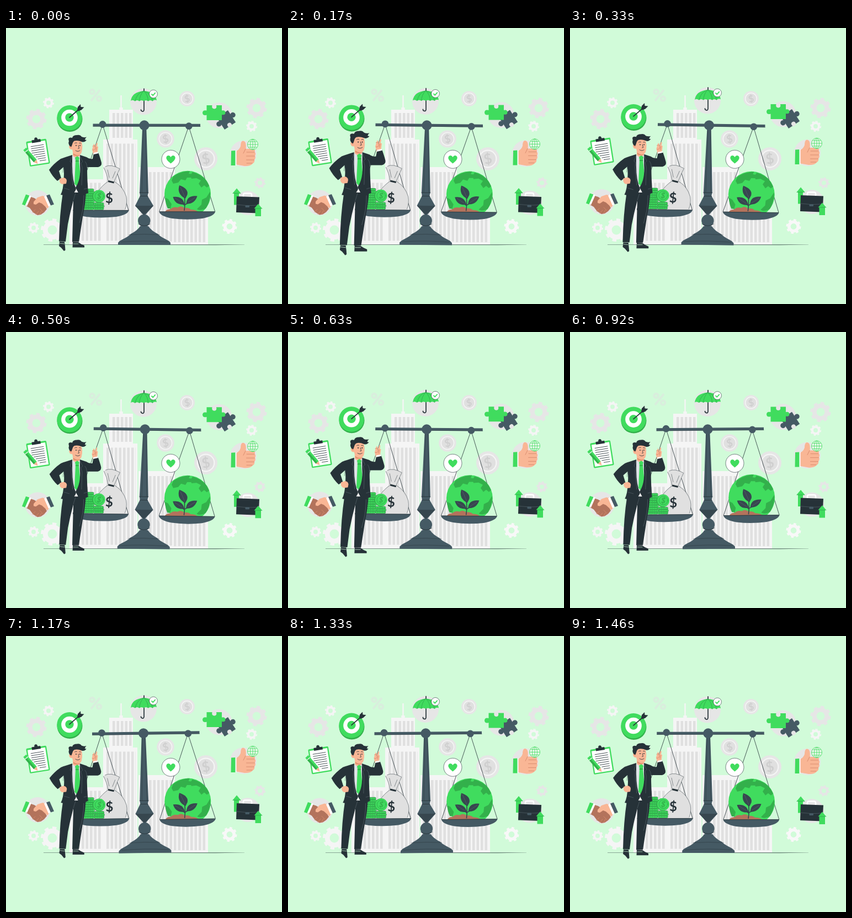
Recreate the animation shown at these times as an HTML page. Size 500 px wide and 500 px high, loop 1500 ms.

```html
<!DOCTYPE html>
<html lang="en">
<head>
<meta charset="utf-8">
<title>Balance</title>
<style>
html, body { margin: 0; height: 100%; overflow: hidden; background: #d1fbd9 }
svg { display: block; width: 100vw; height: 100vh }
text { font-family: Lato, sans-serif; text-anchor: middle; font-weight: bold }
.ink { fill: #263238 } .slate { fill: #455a64 } .green { fill: #40dc5e } .deep { fill: #33b04b }
.pale { fill: #e6e6e6 } .wall { fill: #f5f5f5 } .skin { fill: #f9b695 } .brown { fill: #b3735c }
.win { stroke: #e0e0e0; stroke-dasharray: 4.5 3 }
.line { fill: none; stroke: #263238; stroke-width: .8; stroke-linecap: round; stroke-linejoin: round }
.thin { stroke-width: .5 } .thick { stroke-width: 1.7 }
.gline { fill: none; stroke: #40dc5e }
.fold { stroke: #2b9347; stroke-width: .6 }
.crease { fill: none; stroke: #d68a6c; stroke-width: .9; stroke-linecap: round }
.seam { fill: none; stroke: #5a686f; stroke-width: .6 }
</style>
</head>
<body>
<svg viewBox="0 0 500 500">
  <g id="backdrop"></g>

  <g id="buildings">
    <path class="wall" d="M207.300 122h2.400v22h2v4h18.300v54h-43v-54h18.300v-4h2zM176 202h62v190.500h-62zM115 274h61v118.500h-61zM240 252h66v140.500h-66zM299 338h67v54.500h-67z"/>
    <path class="win" stroke-width="45" d="M193 176.500h34.500"/>
    <path class="win" stroke-width="176" d="M182 297.500h53"/>
    <path class="win" stroke-width="105" d="M122 333h50"/>
    <path class="win" stroke-width="126" d="M244 324h57"/>
    <path class="win" stroke-width="45" d="M304 365.500h58"/>
  </g>
  <path class="ink" opacity=".8" d="M68 392.200H432v.4L380 393.300 68 392.700z"/>

  <g class="float">
    <circle class="deep" cx="115.500" cy="165" r="23"/>
    <circle class="green" cx="115" cy="162.700" r="22.700"/>
    <circle fill="#fff" cx="115" cy="162.500" r="14.800"/>
    <circle class="green" cx="115" cy="162" r="7.700"/>
    <path class="line thick" d="M115 162L136 144"/>
    <path class="ink" d="M129 149l1-6 5-5 .500 5 6 .500-5 5-5 2z"/>
  </g>

  <g class="float">
    <g transform="rotate(-9 58 225.500)">
      <rect class="green" x="39.500" y="203" width="37" height="45.500" rx="2"/>
      <rect fill="#fff" x="41.800" y="206" width="32.400" height="40.200"/>
      <path class="ink" d="M50 207v-5h5q0-4 3-4t3 4h5v5z"/>
      <path class="line" d="M47 213h23M47 217h23M47 221h23M47 225h23M50 229h20M53 233h17M56 237h14M59 241h11"/>
    </g>
    <g transform="translate(34 219) rotate(49)">
      <path class="green" d="M0-3.500h29v7H0z"/>
      <path class="deep" d="M4 0h25v3.500H4z"/>
      <path class="skin" d="M29-3.500l7 3.500-7 3.500z"/>
      <path stroke="#fff" stroke-width="1.200" d="M5-3.500v7"/>
    </g>
  </g>

  <g class="float">
    <circle class="pale" cx="57.500" cy="317" r="23"/>
    <path class="brown" d="M42 305l9 3 18 11 5 9-5 6-6 4-6 1-8-5-6-8-7-4z"/>
    <path class="skin" d="M75 306l-9-2-9 3-7 8 0 4 4 1 6-4 5 2 10 9 5-7z"/>
    <path class="crease" d="M48 334l5-5M54 338l5-6M61 338l3-6M67 333l-6-6"/>
    <path fill="#fff" d="M42 303l4 1.500-8 18-4-2zM73 304l-4 1.500 8 18 4-2z"/>
    <path class="green" d="M36 301.500l6.500 2-8 18-5.500-2z"/>
    <path class="slate" d="M79 301.500l-6 2 8 18 6-2z"/>
  </g>

  <g class="float">
    <circle class="pale" cx="249" cy="133.500" r="24"/>
    <path class="line thick" d="M250 110v38.500q-.5 3-3 2.500t-2.500-3"/>
    <path class="green" d="M226 132q2-16 23.500-18 21 1 23.500 17-4-2-7.500 1.500-4-3-8 0-4-3-8 0-4-3-8 0-4-3-8 0-4-3-7.500-.5z"/>
    <path class="line fold" d="M234 132q3-14 15.500-18-7 7-8 18M249.500 114q8 7 8 18M249.500 114q14 5 16 18"/>
    <circle cx="267" cy="119.500" r="7.400" fill="#fff" stroke="#263238" stroke-width=".6"/>
    <path class="gline" stroke-width="1.800" d="M263.500 119.500l2.700 2.700 4.500-5"/>
  </g>

  <g class="float">
    <circle class="pale" cx="386" cy="158" r="23.500"/>
    <g class="slate" transform="translate(399 166.500) rotate(-33)">
      <rect x="-12" y="-13" width="24" height="26"/>
      <circle cx="15" cy="-1" r="4.700"/><circle cx="-15" cy="-1" r="4.700"/>
      <circle class="pale" cx="0" cy="11" r="4"/>
    </g>
    <path class="green" d="M363.500 140h10q-1.500 6 4 6.500 5-.5 3.500-6.500h10v9.500q6-1.500 6.500 4-.5 5-6.500 3.500v10h-27.500v-9.500q-7 2-7.500-4 .5-5.500 7.500-4z"/>
  </g>

  <g class="float">
    <circle class="pale" cx="430" cy="228" r="24"/>
    <path class="skin" d="M415 224q8-3 10-10 0-9 4-9.500 7 0 5.500 14.500l13 0q5 1 3 5.500 3 3 .5 7 2 4-1 7 1 5-3 7-4 5-15 4.500l-17-3z"/>
    <path class="crease" d="M434 219l-4 8M450 225h-14M450.500 232h-15M449.500 239h-14M446 245h-10"/>
    <path fill="#fff" d="M414.500 222h3v27h-3z"/>
    <path class="green" d="M408 222.500l7.500-.5v27l-8 0z"/>
    <g class="gline" stroke-width=".8">
      <circle cx="447" cy="211" r="9.500" fill="#e8f8ea"/>
      <ellipse cx="447" cy="211" rx="4.500" ry="9.500"/>
      <path d="M447 201.500v19M437.500 211h19M439.500 206h15M439.500 216h15"/>
    </g>
  </g>

  <g class="float">
    <circle class="pale" cx="438" cy="317" r="22"/>
    <path class="green" d="M418 290.500l7.500 9h-3.500v21h-9v-21h-2.500z"/>
    <path fill="none" stroke="#fff" stroke-width="2.500" d="M430 306v-4q0-2.500 3-2.500h9q3 0 3 2.500v4"/>
    <path class="ink" d="M418 305l41 1.500-1.500 29-40.500-1.500z"/>
    <path class="seam" d="M417.500 320q20 3 41 1"/>
    <rect class="slate" x="433.500" y="321" width="7.500" height="4" rx="1"/>
    <path class="green" d="M457 318.500l7 8.500h-2v14h-10.500v-14h-2z"/>
    <path class="line fold" d="M450 327h14M411 299.500h14"/>
  </g>

  <g id="scale">
    <path class="line" d="M175 175L122 330M175 175L222 330M331 178L278 332M331 178L378.500 332"/>
    <path fill="#e0e0e0" d="M180 251Q190 246 206 255Q201 266 196 278Q213 288 218 306Q221 322 212 331H165Q158 318 163 304Q170 288 185 277Q183 264 177 253Z"/>
    <path class="line thin" d="M180 251Q190 246 206 255Q201 266 196 278Q213 288 218 306Q220 318 216 328M185 277Q183 264 177 253M187 271l-3-14M193 272l5-12M185 278Q173 286 167 296"/>
    <path class="ink" d="M185.500 276l10.500 2.500-.6 3-10.500-2.500z"/>
    <text class="ink" x="187" y="317" font-size="24">$</text>
    <g id="stacks"></g>
    <circle class="deep" cx="168" cy="305" r="11.500"/>
    <circle class="green" cx="169" cy="304.500" r="11"/>
    <circle class="line fold" cx="169" cy="304.500" r="7.800"/>
    <text class="deep" x="169" y="309.500" font-size="14" transform="rotate(15 169 304)">$</text>

    <circle class="green" cx="329" cy="300.700" r="42"/>
    <path class="deep" d="M303 269q12-9 30-10l-2 5 8 1-3 6-8 0-3 5-8-2-5 6-9 2-3-6zM338 261q23 6 30 25l-4 3-5-4-5 4-5-7 4-6-8-4-9 1-2-6zM370 296q1 18-8 31-12 5-16 1l8-8 1-9 8-4zM288 307l6 3 6 9-2 8-5 0q-4-8-5-20z"/>
    <path class="brown" d="M288 333q3-5 10-5 5-5 13-3 6-4 12 1 8-1 12 3 9 0 13 4z"/>
    <g fill="#37474f">
      <path d="M325 309q-16-8-11-24 17 6 14.500 17z"/>
      <path d="M326.500 318.500q1-16 20-14-5 15-20 14z"/>
      <path d="M323.500 319.500q-17 2-21-13.500 18-2 21 13.500z"/>
    </g>
    <path d="M323 331q2-17 0-26M324.500 320l7-4M323.500 321l-5-4" fill="none" stroke="#37474f" stroke-width="1.600"/>
    <path class="seam" d="M316 288l8 18M343 307l-14 9M306 308l14 9"/>

    <path class="slate" d="M121.500 330H222.500q-1 8-23 12-27 3-54 0-22-4-24-12zM277.500 332.500H379q-1 8-23 12.500-28 3.500-55 0-22-4-23.500-12.500z"/>
    <path class="line" d="M122 330.300H222M278 332.800H378.500"/>

    <path class="slate" d="M157.500 173.500l194.500.2v5l-194.500-.2z"/>
    <path class="line thin" d="M158 178.200l194 .2"/>
    <circle class="slate" cx="175" cy="174.500" r="6.400"/>
    <circle class="slate" cx="331.300" cy="177.700" r="6.400"/>
    <path class="slate" d="M247 182h7.300l3.700 116-1.500 6 10.500 18-15 17h-3l-15-17 9-18-1-6z"/>
    <path fill="#37474f" d="M234 322h33l-17 17z"/>
    <path class="line" d="M242 298.300h16M243 304.500h14"/>
    <path class="line thin" d="M248.500 184l-2.500 114M253 184l2 114"/>
    <path class="slate" d="M203 393v-4q3-4 8-6 12-6 15-10 12-6 17-14h15q5 8 17 14 3 4 15 10 5 2 8 6v4z"/>
    <path class="line thin" d="M223 374.500q27-2 55 0M208 387.500q42-3 85 0"/>
    <circle class="slate" cx="250.500" cy="176.300" r="9"/>
    <circle class="slate" cx="250.300" cy="349" r="11.200"/>
    <path class="line" d="M240 355q10 7 21 0"/>
  </g>

  <circle cx="298.500" cy="237.800" r="16.500" fill="#fff" stroke="#263238" stroke-width=".6"/>
  <path class="green" d="M298.500 245.500Q290 239 290.300 235Q291 231 294.500 231Q297 231 298.500 234Q300 231 302.500 231Q306 231 306.700 235Q307 239 298.500 245.500Z"/>

  <g id="man">
    <path class="skin" d="M158 229l-2-9 2-7 1-3 2 1 0 5 3-8 2 .5-1 6 2 .5-1 8-1 6z"/>
    <path class="crease" d="M157 214q5-2 5 3t-5 4M164 216l-1 6"/>
    <path class="ink" d="M97 387l9 .5 1 8 .5 7-2.500 1.500-5-6-4-3zM121 387.500l10 .5q5 4 11 6v3.500h-21.500z"/>
    <path stroke="#d1fbd9" stroke-width=".7" d="M97 390l9 1M121.500 391h10"/>
    <path class="ink" d="M103 298h42q-1 20-6 44l-7 45.500h-12l2-75q-6 22-10 43l-4 31.500-12-.5q1-50 7-88z"/>
    <path class="seam" d="M122 312l4-13M141 303q0 25-8 50"/>
    <path fill="#dfe3e7" d="M117 232l17-3 4 4 1 58h-20z"/>
    <path class="skin" d="M121 224h13v7l-6 5-7-4z"/>
    <path fill="#e08e6c" d="M122 227q6 5 11 2l0 2q-7 2-11-1z"/>
    <path class="green" d="M125 235l4-3 4 3-1 5 4 40-5 10-7-8 2-42z"/>
    <path class="deep" d="M126 240h6l.3 2h-6.600z"/>
    <path class="ink" d="M120 230q-13 4-21 7-13 9-21 20 6 12 15 20l7-5-4-13 8-7q2 12 0 25 0 15-5 25l20 4 8-14q-7-16-7-42zM134 230l12 4q5 4 11 3l2-10 8-2q4 11 6 19 1 6-6 8l-20 0q0 25 2 47l-15 5-8-15q10-15 8-40z"/>
    <path class="skin" d="M97 273l7-2q6 1 6 6l-1 5-7 1q-4-1-5-5z"/>
    <path class="seam" d="M120 232l-4 10 3 3-1 8 3 32M134 232l5 10-3 3 2 8-1 32M104 252l-1 10M147 252q-1-8-4-10M105 290l10 3M141 292l7-2"/>
    <path fill="#fff" d="M158.500 226l8.500-1.500.6 2.500-9 2z"/>

    <path class="skin" d="M116 206q5-6 20-3 4 10 1 22-2 6-8 5-8-1-9-10-5 1-6-5 1-4 3-3z"/>
    <path class="ink" d="M116.500 215Q112 210 114 205Q111 197 120 199Q121 194 129 194Q134 193 137 197Q141 199 146 197.500Q143 200 143 202.500L146 203Q142 208 137 206Q130 203 124 204.500Q121 206 120 211L118.500 215Z"/>
    <g class="line">
      <path d="M124.500 208.700q2-1.500 4-.5M132.500 208.500q2-1 3.500.5M131 212.500l1.500 5.500-2 .3M126 222q4 3 8 0"/>
      <path class="thick" d="M127 212.600v.4M134 212.600v.4"/>
    </g>
    <path class="crease" d="M115.500 214q2 0 2.500 3"/>
  </g>
</svg>
<script>
const $ = id => document.getElementById(id);
const LOOP = 1500, TAU = 2 * Math.PI;

const gear = (x, y, r, color) =>
  `<g fill="none" stroke="${color}"><circle cx="${x}" cy="${y}" r="${r * .61}" stroke-width="${r * .42}"/>
   <circle cx="${x}" cy="${y}" r="${r * .89}" stroke-width="${r * .22}" pathLength="16" stroke-dasharray="1 1"/></g>`;

const coin = (x, y, r) =>
  `<circle cx="${x}" cy="${y}" r="${r}" fill="#e6e6e6"/>
   <circle cx="${x}" cy="${y}" r="${r * .73}" fill="#e0e0e0" stroke="#f5f5f5" stroke-width="${r * .1}"/>
   <text x="${x}" y="${y + r * .43}" font-size="${r * 1.2}" fill="#cfcfcf" transform="rotate(-12 ${x} ${y})">$</text>`;

const stack = (x, y, w, count) => Array.from({ length: count }, (_, i) =>
  `<rect x="${x + i % 2 * .8}" y="${y - i * 4.2}" width="${w}" height="4.2" rx="1.5" class="green" stroke="#23843c" stroke-width=".7"/>
   <path d="M${x + 3} ${y + 2.1 - i * 4.2}h${w - 5}" stroke="#23843c" stroke-width="2" stroke-dasharray=".7 2.4"/>`).join('');

$('backdrop').innerHTML = [
  [55, 165, 18.5, '#e6e6e6'], [77, 135.5, 10, '#f5f5f5'], [50, 362, 10, '#f5f5f5'], [84, 366, 21, '#f5f5f5'],
  [454, 145, 18.5, '#e6e6e6'], [445, 178, 10, '#f5f5f5'], [460, 280.5, 10, '#e6e6e6'], [405, 359.5, 13.5, '#f8f8f8']
].map(g => gear(...g)).join('') +
  `<g fill="none" stroke="#d9eedd" stroke-width="4"><circle cx="156" cy="115.500" r="3.800"/>
   <circle cx="168.500" cy="128" r="3.800"/><path d="M170 112L154 132"/></g>`;
$('buildings').insertAdjacentHTML('beforeend',
  [[328, 128, 14], [289, 201, 15.8], [362, 237, 21]].map(c => coin(...c)).join(''));
$('stacks').innerHTML = stack(140, 325, 19, 9) + stack(159, 325, 18, 3);

// Heartbeat: [time, scale], eased between neighbours
const beat = [[0, 1], [210, 1.08], [410, .985], [520, .985], [740, 1.08], [920, .985], [1300, .985], [LOOP, 1]];
function pulse(t) {
  const i = beat.findIndex(k => k[0] > t), [t0, a] = beat[i - 1], [t1, b] = beat[i];
  const u = (t - t0) / (t1 - t0);
  return a + (b - a) * u * u * (3 - 2 * u);
}

const floats = document.querySelectorAll('.float');
function draw() {
  const t = performance.now() % LOOP, phase = TAU * t / LOOP;
  const lift = -2.5 * (1 - Math.cos(phase));
  for (const icon of floats) icon.setAttribute('transform', `translate(0 ${lift})`);
  $('scale').setAttribute('transform', `rotate(${.8 * Math.sin(phase)} 250.5 284)`);
  $('man').setAttribute('transform', `translate(125 298.5) scale(${pulse(t)}) translate(-125 -298.5)`);
  requestAnimationFrame(draw);
}
draw();
</script>
</body>
</html>
```
